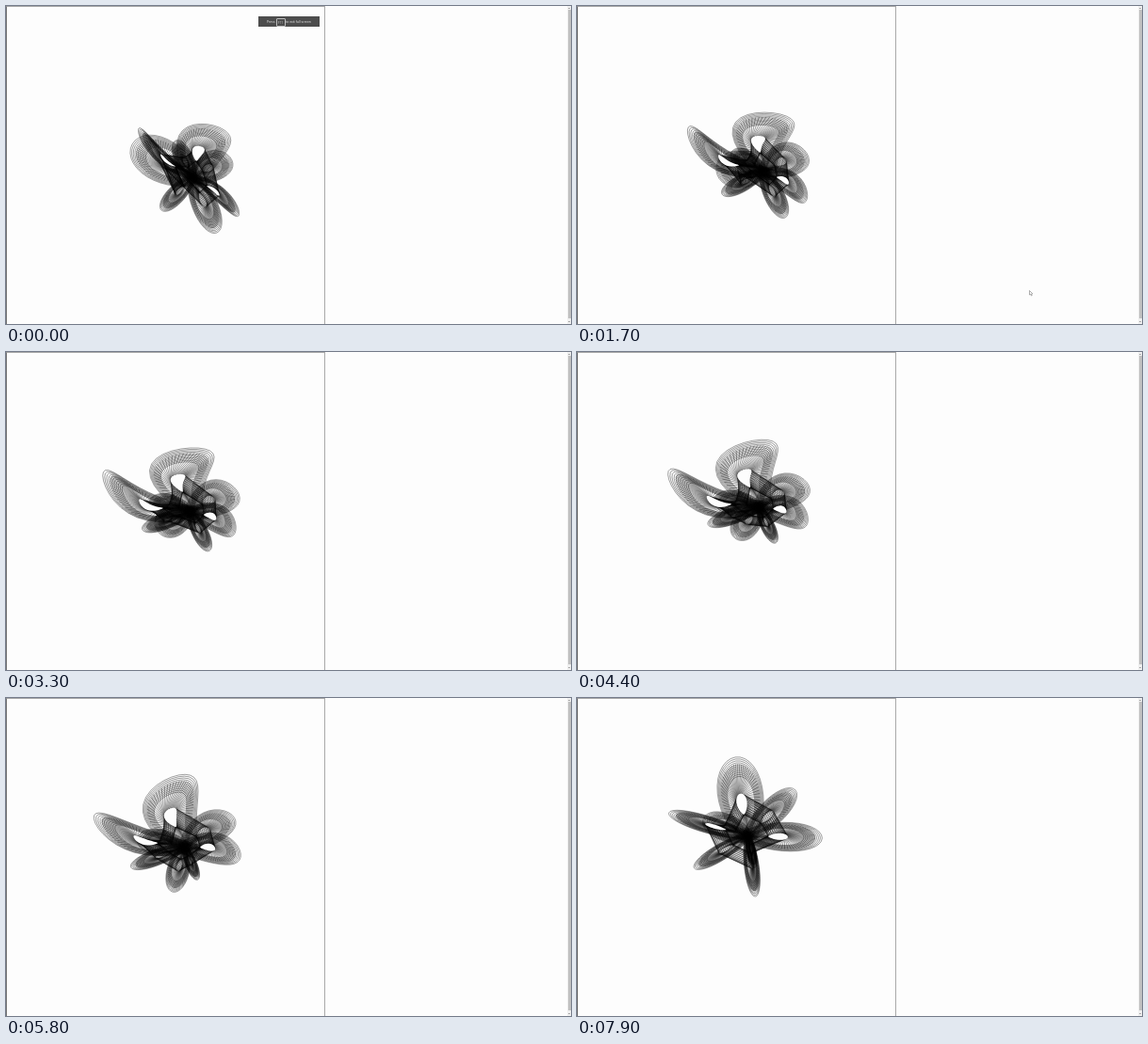
An HTML page with a canvas that plays this animation: 600 by 338 pixels, repeating every 8 s.

```html
<!DOCTYPE html>
<html lang="en">
<head>
<meta charset="utf-8">
<title>String figure</title>
<style>
html, body { margin: 0; width: 100%; height: 100%; overflow: hidden; background: #fdfdfd; }
#stage { position: relative; width: 600px; height: 338px; overflow: hidden; }
#stage > * { position: absolute; }
canvas { left: 0; top: 0; }
#frame { left: 0; top: 0; width: 337px; height: 338px; border: solid #a9a9a9; border-width: 1px 1px 0; border-left-color: #777; }
#bar { left: 596px; top: 0; width: 4px; height: 338px; background: #f1f1f1; }
#thumb { left: 597px; top: 4px; width: 3px; height: 328px; background: #c1c1c1; }
.arrow { left: 597px; width: 2px; height: 1px; background: #aaa; }
#toast { left: 268px; top: 11px; width: 65px; height: 11px; background: #4d4d4d; color: #f4f4f4;
  font: 3.4px/11px "Open Sans", Arial, sans-serif; white-space: nowrap; }
#toast span { position: absolute; top: 0; }
#toast .key { left: 18.5px; top: 1.5px; width: 8px; height: 7px; line-height: 7px; text-align: center;
  border: .6px solid #bbb; border-radius: 1px; color: #ccc; }
#cursor { width: 5px; height: 7px; }
</style>
</head>
<body>
<div id="stage">
  <canvas id="art" width="600" height="338"></canvas>
  <div id="frame"></div>
  <div id="bar"></div><div id="thumb"></div>
  <div class="arrow" style="top:2px"></div><div class="arrow" style="top:335px"></div>
  <div id="toast"><span style="left:9px">Press</span><span class="key">F11</span><span style="left:29px">to exit full screen</span></div>
  <svg id="cursor" viewBox="0 0 5 7"><path d="M.5 .5V5L1.6 4.2 2.5 6 3.2 5.6 2.5 4 3.8 3.8Z" fill="#fff" stroke="#777" stroke-width=".6"/></svg>
</div>
<script>
const LOOP = 8000, STEP = 100, TAU = Math.PI * 2;
const ctx = document.getElementById('art').getContext('2d');
const toast = document.getElementById('toast');
const cursor = document.getElementById('cursor');

const clamp = v => Math.max(0, Math.min(1, v));
const mix = (p, q, s) => [p[0] + (q[0] - p[0]) * s, p[1] + (q[1] - p[1]) * s];

// Parabola through the values at the start, middle and end of the loop.
const glide = ([a, b, c], u) => a * (1 - u) * (1 - 2 * u) + 4 * b * u * (1 - u) + c * u * (2 * u - 1);

// Lobes in order around the hub: path of the tip, half width, sideways lean.
const hub = { x: [198, 194, 181], y: [182, 167, 146] };
const lobes = [
  { x: [232, 206, 167], y: [132, 97, 62], width: [27, 32, 25], lean: .32, open: true },
  { x: [240, 247, 231], y: [164, 146, 96], width: [17, 20, 14], lean: .1 },
  { x: [247, 244, 261], y: [223, 186, 148], width: [8, 16, 16], lean: .12, open: true },
  { x: [224, 213, 188], y: [241, 206, 180], width: [14, 8, 5], lean: 0 },
  { x: [134, 165, 190], y: [147, 195, 211], width: [24, 16, 8], lean: 0 },
  { x: [165, 141, 124], y: [217, 185, 181], width: [10, 9, 9], lean: 0 },
  { x: [141, 99, 98], y: [130, 127, 122], width: [7, 16, 9], lean: .14, open: true },
  { x: [180, 148, 134], y: [143, 158, 127], width: [10, 14, 15], lean: 0 }
];

// Returns at(angle, scale): a point on the lobe's outline, scaled about its focus.
function shapeOf(lobe, u) {
  const base = [glide(hub.x, u), glide(hub.y, u)];
  const tip = [glide(lobe.x, u), glide(lobe.y, u)];
  const vx = tip[0] - base[0], vy = tip[1] - base[1], length = Math.hypot(vx, vy);
  const half = glide(lobe.width, u) / length;
  const lean = lobe.lean * Math.sin(Math.PI * (.2 + .8 * u));
  const place = (along, across) => {
    const side = across + lean * 4 * along * (1 - along);
    return [base[0] + vx * along + vy * side, base[1] + vy * along - vx * side];
  };
  const focus = place(.4, 0);
  return (angle, scale) => {
    const along = .5 - Math.cos(angle) / 2;
    const across = half * Math.sin(angle) * Math.sqrt(Math.abs(Math.sin(angle / 2))) * 1.1;
    return mix(focus, place(along * 1.15 - .15, across), scale);
  };
}

function ring(at, scale) {
  const sides = 34;
  for (let k = 0; k <= sides; k++) ctx.lineTo(...at(k / sides * TAU, scale));
}

function line(p, q) {
  ctx.moveTo(...p);
  ctx.lineTo(...q);
}

function strokes(count, draw) {
  for (let k = 0; k < count; k++) {
    ctx.beginPath();
    draw(k / count);
    ctx.stroke();
  }
}

const HOLE = .23, TWIST = .6;

function drawArt(u) {
  ctx.clearRect(0, 0, 600, 338);
  ctx.lineWidth = .5;
  ctx.strokeStyle = 'rgba(0,0,0,.75)';
  const shapes = lobes.map(lobe => shapeOf(lobe, u));
  shapes.forEach((at, n) => {
    const next = shapes[(n + 1) % shapes.length];
    strokes(11, k => ring(at, 1 - .45 * k));
    strokes(70, k => line(at(k * TAU, HOLE), at(k * TAU + TWIST, .85)));
    // Threads that tie neighbouring lobes together form the dark core.
    strokes(26, k => line(at(k * TAU, HOLE), next(-k * TAU, HOLE)));
  });
  ctx.fillStyle = '#fdfdfd';
  shapes.forEach((at, n) => {
    if (!lobes[n].open) return;
    ctx.beginPath();
    ring(at, HOLE);
    ctx.fill();
  });
}

function drawCursor(t) {
  const enter = clamp((900 - t) / 400);
  cursor.style.display = t >= 500 && t < 2700 ? '' : 'none';
  cursor.style.left = 508 + 28 * Math.cos((t - 900) / 1600 * TAU) + 48 * enter + 'px';
  cursor.style.top = 302 + 26 * enter + 'px';
}

function render(t) {
  drawArt(t / LOOP);
  drawCursor(t);
  toast.style.opacity = 1 - clamp((t - 300) / 400);
}

const start = performance.now();
let last = -1;
function tick() {
  const t = Math.floor((performance.now() - start) % LOOP / STEP) * STEP;
  if (t !== last) render(last = t);
  requestAnimationFrame(tick);
}
tick();
</script>
</body>
</html>
```
